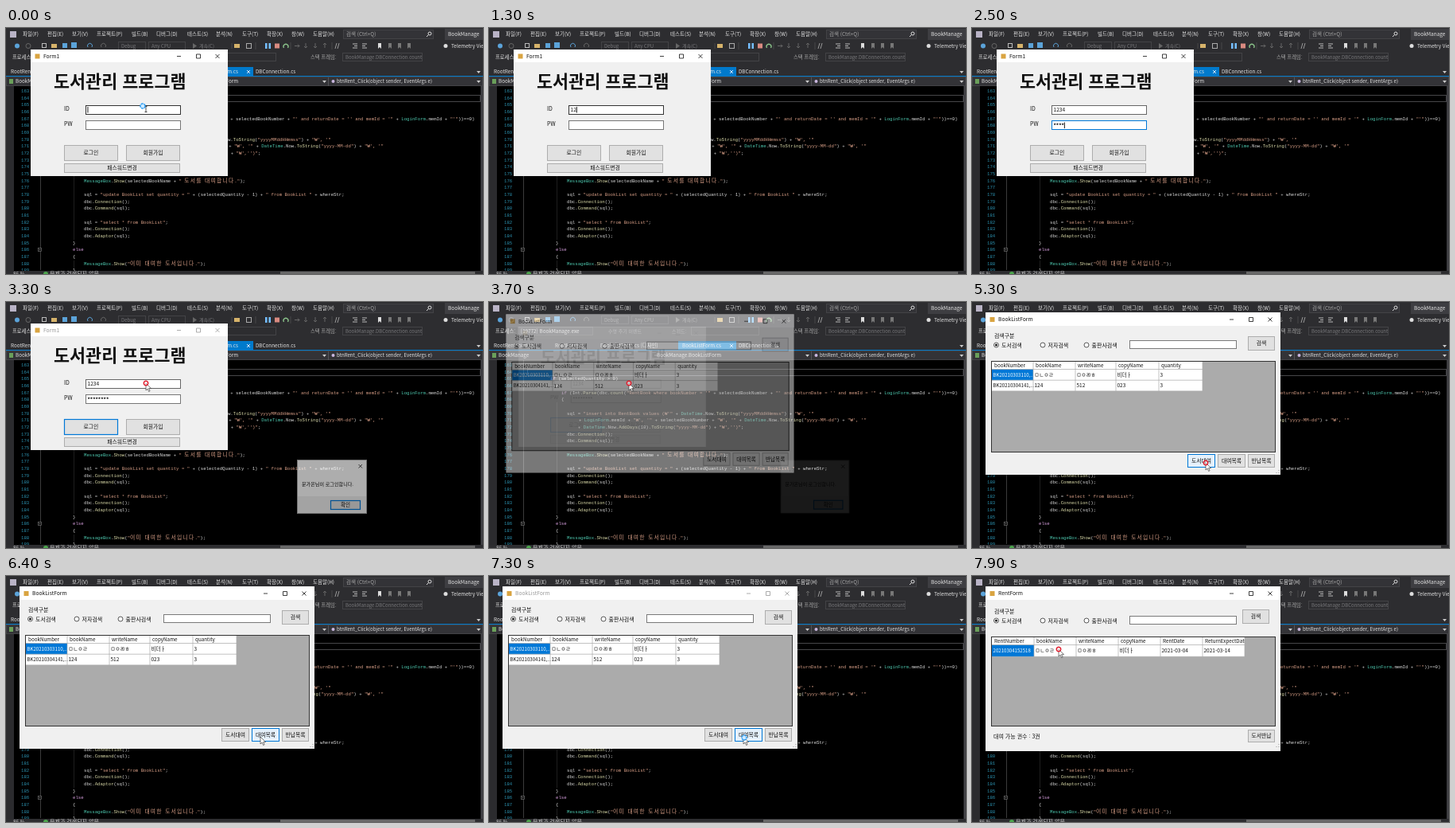
Animation of 600x309 px, one loop 8 s. Source, as an HTML page:

```html
<!DOCTYPE html>
<html lang="ko">
<head>
<meta charset="utf-8">
<title>Book manager</title>
<style>
html, body { margin: 0; width: 100%; height: 100%; overflow: hidden; background: #000; }
svg { display: block; width: 100vw; height: 100vh; }
text { font-family: "Noto Sans CJK KR", "Noto Sans CJK", "Noto Sans", sans-serif; white-space: pre; }
.code { font-family: "Liberation Mono", "Noto Sans CJK KR", monospace; font-size: 5.7px; fill: #dcdcdc; }
.str { fill: #d69d85; }
.key { fill: #d8a0df; }
.type { fill: #4ec9b0; }
.call { fill: #dcdcaa; }
.han { font-size: 6.8px; letter-spacing: 1.2px; }
.win { transform-box: fill-box; transform-origin: center; }
</style>
</head>
<body>
<svg id="stage" viewBox="0 0 600 309" preserveAspectRatio="none"></svg>
<script>
const LOOP = 8000, BLUE = '#0078d7';
const stage = document.getElementById('stage');

// y is the middle of the text line
const text = (x, y, s, { size = 6.3, fill = '#111', attrs = '' } = {}) =>
  `<text x="${x}" y="${y + size * .36}" font-size="${size}" fill="${fill}" ${attrs}>${s}</text>`;
const box = (x1, y1, x2, y2, fill, attrs = '') =>
  `<rect x="${x1}" y="${y1}" width="${x2 - x1}" height="${y2 - y1}" fill="${fill}" ${attrs}/>`;
const framed = (x1, y1, x2, y2, fill, stroke, attrs = '') =>
  box(x1 + .5, y1 + .5, x2 - .5, y2 - .5, fill, `stroke="${stroke}" ${attrs}`);
const line = (d, stroke, w = 1) => `<path d="${d}" fill="none" stroke="${stroke}" stroke-width="${w}"/>`;
const group = (id, body, cls = '') => `<g id="${id}" class="${cls}">${body}</g>`;

function button(x1, y1, x2, y2, label, id = '') {
  return framed(x1, y1, x2, y2, '#e1e1e1', '#adadad', id && `id="${id}"`) +
    text((x1 + x2) / 2, (y1 + y2) / 2, label, { size: 6.8, attrs: 'text-anchor="middle"' });
}

function windowFrame(x1, y1, x2, y2, title, id, bar = 16) {
  const y = y1 + bar / 2 + .5;
  return box(x1, y1, x2, y2, '#f0f0f0') + box(x1, y1, x2, y1 + bar, '#fff') +
    box(x1 + 5.5, y - 3, x1 + 11.5, y + 3, '#d9a441') +
    group(id, text(x1 + 16, y, title, { size: 6.7, fill: 'currentColor' }) +
      line(`M${x2 - 64} ${y}h5M${x2 - 39.5} ${y - 2.5}h5v5h-5zM${x2 - 15.5} ${y - 2.5}l5 5m0 -5l-5 5`, 'currentColor', .8));
}

function paintCode(s) {
  return s.replace(/("[^"]*")|\b(if|else)\b|\b(MessageBox|DateTime|LoginForm)\b|(\w+)(?=\()/g,
    (all, str, key, type) => {
      const cls = str ? 'str' : key ? 'key' : type ? 'type' : 'call';
      const body = all.replace(/[가-힣]+/g, h => `<tspan class="han">${h}</tspan>`);
      return `<tspan class="${cls}">${body}</tspan>`;
    });
}

const codeLines = [
  [165, 77, 'if (selectedQuantity > 0)'],
  [166, 84, '{'],
  [167, 91, `if (Int.Parse(dbc.count("RentBook where bookNumber = '" + selectedBookNumber + "' and returnDate = '' and memId = '" + LoginForm.memId + "'"))==0)`],
  [168, 91, '{'],
  [170, 98, `sql = "insert into RentBook values (₩'" + DateTime.Now.ToString("yyyyMMddHHmmss") + "₩', '"`],
  [171, 113, `+ LoginForm.memId + "₩', '" + selectedBookNumber + "₩', '" + DateTime.Now.ToString("yyyy-MM-dd") + "₩', '"`],
  [172, 112, `+ DateTime.Now.AddDays(10).ToString("yyyy-MM-dd") + "₩','')";`],
  [173, 98, 'dbc.Connection();'],
  [174, 98, 'dbc.Command(sql);'],
  [176, 98, 'MessageBox.Show(selectedBookName + " 도서를 대여합니다.");'],
  [178, 98, 'sql = "update BookList set quantity = " + (selectedQuantity - 1) + " from BookList " + whereStr;'],
  [179, 98, 'dbc.Connection();'],
  [180, 98, 'dbc.Command(sql);'],
  [182, 98, 'sql = "select * from BookList";'],
  [183, 98, 'dbc.Connection();'],
  [184, 98, 'dbc.Adaptor(sql);'],
  [185, 84, '}'],
  [186, 84, 'else'],
  [187, 84, '{'],
  [188, 98, 'MessageBox.Show("이미 대여한 도서입니다.");'],
  [189, 84, '}']
];
const lineY = n => 79 + (n - 163) * 8.66;

function editor() {
  let out = box(0, 73, 600, 309, '#000') + box(0, 73, 10, 309, '#2b2b2e');
  out += line('M43.5 73V304', '#555', .7) + line('M85.5 126V266M85.5 292V304', '#333', .6);
  out += framed(48, 84, 597, 93, 'none', '#464649') + box(597, 73, 600, 305, '#3e3e42');
  for (let n = 163; n < 190; n++)
    out += `<text class="code" x="19" y="${lineY(n) + 2}" style="fill:#2b91af">${n}</text>`;
  for (const [n, x, s] of codeLines)
    out += `<text class="code" x="${x}" y="${lineY(n) + 2}">${paintCode(s)}</text>`;
  out += framed(40, 276, 45, 281, '#000', '#888', 'stroke-width=".6"') + line('M41.5 278.5h2', '#aaa', .6);
  out += box(0, 305, 600, 309, '#2d2d30') + box(345, 306, 590, 309, '#686868');
  out += text(9, 308.5, '86 %', { fill: '#ccc' }) + text(55, 308.5, '문제가 검색되지 않음', { size: 7, fill: '#ccc' });
  return out + `<circle cx="50" cy="309" r="3" fill="#4ca64c"/>`;
}

function toolbar() {
  const light = { fill: '#e6e6e6' }, dim = { fill: '#77777a', size: 6 };
  let out = box(0, 0, 600, 73, '#2d2d30') + box(5, 4, 13, 12, '#b9b3c6');
  const menu = [[21, '파일(F)'], [52, '편집(E)'], [83, '보기(V)'], [114, '프로젝트(P)'], [158, '빌드(B)'],
    [189, '디버그(D)'], [228, '테스트(S)'], [264, '분석(N)'], [297, '도구(T)'], [328, '확장(X)'], [359, '창(W)'], [386, '도움말(H)']];
  for (const [x, s] of menu) out += text(x, 8, s, { ...light, size: 6.5 });
  out += framed(424, 2, 538, 14, '#333337', '#434346') + text(428, 8, '검색 (Ctrl+Q)', { fill: '#aaa', size: 6.5 });
  out += `<circle cx="533" cy="7" r="2" fill="none" stroke="#ddd"/>` + line('M531.5 8.5l-2.5 2.5', '#ddd');
  out += box(552, 1, 600, 15, '#3e3e42') + text(556, 8, 'BookManage', { ...light, size: 6.5 });

  out += `<circle cx="14" cy="22.5" r="3" fill="#5ba3d9"/><circle cx="28" cy="22.5" r="3" fill="none" stroke="#666"/>`;
  out += framed(45, 19, 51, 25, 'none', '#bbb') + box(57, 20, 64, 25, '#d6b36a');
  out += box(71, 19, 77, 25, '#5ba3d9') + box(82, 18, 89, 25, '#5ba3d9');
  out += line('M103 24a3 3 0 1 1 5 0', '#5ba3d9') + line('M120 24a3 3 0 1 1 5 0', '#666');
  out += framed(141, 17, 176, 28, '#2d2d30', '#434346') + text(145, 22.5, 'Debug', dim);
  out += framed(179, 17, 226, 28, '#2d2d30', '#434346') + text(183, 22.5, 'Any CPU', dim);
  out += '<path d="M235 19l5 3.5-5 3.5z" fill="#666"/>' + text(243, 22.5, '계속(C)', dim);
  out += line('M284 19v7M314 18v9M358 18v9M410 18v9', '#555', .7);
  out += box(287, 20, 294, 25, '#d6b36a') + framed(302, 19, 309, 26, 'none', '#aaa');
  out += box(326, 19, 328.5, 26, '#75bfff') + box(330.5, 19, 333, 26, '#75bfff') + box(338, 19.5, 344, 25.5, '#d98a80');
  out += line('M349.5 25a3 3 0 1 1 5 0', '#8bc48b', 1.3);
  out += line('M363 22.5h6l-2 -2m2 2l-2 2M377 19v6m-2 -2l2 2l2 -2M389 19v6m-2 -2l2 2l2 -2M401 25v-6m-2 2l2 -2l2 2', '#666');
  out += line('M414 26l2 -7m1 7l2 -7', '#999') + line('M436 20h6m-4 2.5h4m-6 2.5h6M448 20h6m-6 2.5h4m-4 2.5h6', '#bbb');
  const mark = (x, fill) => `<path d="M${x} 19h4v7l-2-2-2 2z" fill="${fill}"/>`;
  out += mark(468, '#ddd') + mark(481, '#777') + mark(493, '#777') + mark(505, '#777');
  out += '<circle cx="553" cy="22.5" r="2.5" fill="#ddd"/>' + text(560, 22.5, 'Telemetry View', { ...light, size: 6.4 });

  out += text(8, 36.5, '프로세스:', light) + framed(36, 31, 131, 42, '#333337', '#434346') + text(40, 36.5, '[19772] BookManage.exe', light);
  out += text(150, 36.5, '수명 주기 이벤트', dim) + text(230, 36.5, '스레드:', dim) + framed(254, 31, 340, 42, '#2d2d30', '#434346');
  out += text(383, 36.5, '스택 프레임:', { fill: '#aaa' }) + framed(423, 31, 524, 42, '#2d2d30', '#434346') +
    text(427, 36.5, 'BookManage.DBConnection.count', dim);

  out += box(238, 49, 311, 61, '#007acc') + box(0, 60, 600, 61, '#007acc');
  out += text(6, 55, 'RootRentForm.cs', light) + text(83, 55, 'RentForm.cs', light) + text(140, 55, 'BookListForm.cs [디자인]', light);
  out += text(243, 55, 'BookListForm.cs', light) + line('M303 53l4 4m0 -4l-4 4', '#fff', .8) + text(314, 55, 'DBConnection.cs', light);

  out += framed(0, 61, 600, 73, '#333337', '#434346') + box(4, 64, 9, 70, '#6a9f5a');
  out += text(12, 67, 'BookManage', light) + text(211, 67, 'BookManage.BookListForm', light);
  out += line('M203.5 62v11M405.5 62v11', '#55555a') + '<circle cx="411.5" cy="67" r="2" fill="#c9b6de"/>';
  return out + text(416, 67, 'btnRent_Click(object sender, EventArgs e)', { ...light, size: 6.1 }) +
    '<path d="M398 66h5l-2.5 3zM592 54h5l-2.5 3zM592 66h5l-2.5 3z" fill="#ccc"/>';
}

function loginForm() {
  return windowFrame(31, 27, 279, 186, 'Form1', 'loginTitle') +
    text(60, 67.3, '도서관리 프로그램', { size: 21.8, attrs: 'font-weight="700"' }) +
    text(73, 101, 'ID', { size: 7 }) + text(73, 120.5, 'PW', { size: 7 }) +
    framed(100, 97, 220, 109, '#fff', '#333', 'id="idField"') + framed(100, 116, 220, 128, '#fff', '#777', 'id="pwField"') +
    text(102.5, 102.5, '', { size: 6.6, attrs: 'id="idText"' }) +
    text(102.5, 123, '', { size: 6.6, attrs: 'id="pwText" font-weight="700"' }) +
    `<rect id="caret" width=".9" height="7.5" fill="#000"/>` +
    button(73, 147, 141, 167, '로그인', 'loginBtn') + button(151, 147, 219, 167, '회원가입') + button(73, 170, 219, 182, '패스워드변경');
}

function dialog() {
  return framed(366, 198, 454, 266, '#fff', '#aaa') + box(367, 244, 453, 265, '#f0f0f0') +
    line('M443.5 204l4.5 4.5m0 -4.5l-4.5 4.5', '#222', .8) + text(372, 229, '문가온님이 로그인합니다.', { size: 6.1 }) +
    framed(408, 249, 446, 261, '#e1e1e1', BLUE, 'stroke-width="1.2"') +
    text(427, 255, '확인', { size: 6.6, attrs: 'text-anchor="middle"' });
}

// search row shared by both list windows
function searchRow(y) {
  let out = text(28, y - 11, '검색구분', { size: 6.9 });
  [[30.5, '도서검색'], [89, '저자검색'], [144, '출판사검색']].forEach(([x, s], i) => {
    out += `<circle cx="${x}" cy="${y}" r="3" fill="#fff" stroke="#333" stroke-width=".8"/>`;
    if (!i) out += `<circle cx="${x}" cy="${y}" r="1.6" fill="#222"/>`;
    out += text(x + 6.5, y, s, { size: 7 });
  });
  return out + framed(198, y - 6, 333, y + 5, '#fff', '#7a7a7a');
}

function table(top, head, step, cols, names, rows) {
  const right = cols[cols.length - 1], bottom = top + head + step * rows.length;
  let out = framed(24, top, 382, 189, '#ababab', '#333') + box(25, top + 1, right, bottom, '#fff');
  names.forEach((s, i) => out += text(cols[i] + 3, top + head / 2 + .7, s, { size: 6.3 }));
  rows.forEach((row, r) => {
    const y = top + head + step * r;
    if (!r) out += box(25, y, cols[1], y + step, BLUE);
    row.forEach((s, i) => out += text(cols[i] + 1.5, y + step / 2, s, { size: i ? 6.5 : 6.1, fill: r || i ? '#111' : '#fff' }));
    out += line(`M25 ${y}H${right}`, '#aaa', .7);
  });
  return out + line(`M25 ${bottom}H${right}` + cols.slice(1).map(x => `M${x} ${top + 1}V${bottom}`).join(''), '#aaa', .7);
}

const grip = line('M386 211v1M386 214v1M383 214v1', '#999', 1);
const bookForm = () => windowFrame(17, 13, 388, 217, 'BookListForm', 'bookTitle', 17) + searchRow(54) +
  button(347, 43, 381, 61, '검색') +
  table(74, 10.5, 13.7, [25, 77, 130, 181, 235, 290], ['bookNumber', 'bookName', 'writeName', 'copyName', 'quantity'], [
    ['BK20210303110,...', 'ㅁㄴㅇㄹ', 'ㅁㅇㄻㅎ', '비더ㅏ', '3'],
    ['BK20210304141,...', '124', '512', '023', '3']]) +
  button(271, 191, 306, 208, '도서대여', 'rentBtn') + button(309, 191, 344, 208, '대여목록', 'listBtn') +
  button(347, 191, 381, 208, '반납목록') + grip;

const rentForm = () => windowFrame(17, 13, 388, 220, 'RentForm', 'rentTitle', 17) + searchRow(56) +
  button(340, 42, 374, 60, '검색') +
  '<clipPath id="cut"><rect x="24" y="70" width="319" height="40"/></clipPath>' +
  table(76, 10.5, 14.8, [25, 78, 131, 184, 237, 290, 343],
    ['RentNumber', 'bookName', 'writeName', 'copyName', 'RentDate'],
    [['20210304152518', 'ㅁㄴㅇㄹ', 'ㅁㅇㄻㅎ', '비더ㅏ', '2021-03-04', '2021-03-14']]) +
  `<g clip-path="url(#cut)">${text(293, 82, 'ReturnExpectDate')}</g>` +
  text(27, 201, '대여 가능 권수 : 3권', { size: 7 }) + button(347, 193, 381, 209, '도서반납') + grip;

const pointer = '<path id="arrow" d="M0 0v9l2.1-1.9 1.5 3.4 1.5-.7-1.5-3.2h2.9z" fill="#fff" stroke="#222" stroke-width=".6"/>' +
  '<path id="beam" d="M-1.5 -3.5h3M0 -3.5v7M-1.5 3.5h3" fill="none" stroke="#222" stroke-width=".8"/>' +
  '<circle id="busy" r="3" fill="#cfeaff" stroke="#2a9df4" stroke-width="1.5" stroke-dasharray="3 .8"/>' +
  '<circle id="click" r="2.7" fill="#fff" fill-opacity=".5" stroke="#e02030" stroke-width="1.5"/>';

stage.innerHTML = editor() + toolbar() + group('login', loginForm(), 'win') + group('msg', dialog(), 'win') +
  group('books', bookForm(), 'win') + group('rents', rentForm(), 'win') + group('pointer', pointer);

const el = {};
stage.querySelectorAll('[id]').forEach(e => el[e.id] = e);
const set = (id, attrs) => { for (const k in attrs) el[id].setAttribute(k, attrs[k]); };
const show = (id, on) => { el[id].style.display = on ? '' : 'none'; };

// keys: [time, value, ...], linear in between
function mix(t, keys, i = 1) {
  if (t <= keys[0][0]) return keys[0][i];
  for (let k = 1; k < keys.length; k++) {
    const a = keys[k - 1], b = keys[k];
    if (t <= b[0]) return a[i] + (b[i] - a[i]) * (t - a[0]) / (b[0] - a[0]);
  }
  return keys[keys.length - 1][i];
}

function fade(id, t, keys) {
  const o = mix(t, keys);
  show(id, o > 0);
  el[id].style.opacity = o;
  el[id].style.transform = `scale(${mix(t, keys, 2)})`;
}

const opening = start => [[start, 0, .94], [start + 100, .5, .976], [start + 200, .9, .995], [start + 300, 1, 1]];
const path = [[4500, 176, 102], [4700, 196, 121], [5000, 270, 182], [5200, 294, 202], [5900, 294, 202], [6400, 320, 202],
  [7600, 320, 202], [7700, 262, 170], [7800, 160, 118], [7900, 109, 92]];
const within = (t, a, b) => t >= a && t < b;

function draw(t) {
  fade('login', t, [[3600, 1, 1], [3700, .16, .95], [3800, 0, .92]]);
  fade('msg', t, [[3200, 0, .97], [3300, .68, 1], [3400, 1, 1], [3600, 1, 1], [3700, .1, .985], [3800, 0, .95]]);
  fade('books', t, opening(3600));
  fade('rents', t, opening(7300));

  const digits = Math.max(0, Math.min(4, (t - 1100) / 100));
  const stars = t < 2500 ? Math.max(0, Math.floor((t - 1700) / 200)) : Math.min(8, 4 + (t - 2500) / 100);
  const onPw = within(t, 1700, 2900), done = t >= 2900;
  el.idText.textContent = '1234'.slice(0, digits);
  el.pwText.textContent = '*'.repeat(stars);
  set('idField', { stroke: onPw || done ? '#666' : '#333' });
  set('pwField', { stroke: onPw ? BLUE : '#777' });
  set('loginBtn', { stroke: done ? BLUE : '#adadad', 'stroke-width': done ? 1.2 : 1 });
  const field = onPw ? el.pwText : el.idText;
  set('caret', { x: 102.5 + (field.textContent ? field.getComputedTextLength() : 0), y: onPw ? 118.5 : 99 });
  show('caret', !done && (t % 1000 < 600 || t >= 1100));

  const hover = (id, on) => set(id, { fill: on ? '#e5f1fb' : '#e1e1e1', stroke: on ? BLUE : '#adadad' });
  hover('rentBtn', within(t, 5100, 6200));
  hover('listBtn', t >= 6300);
  const active = (id, on) => set(id, { color: on ? '#111' : '#999' });
  active('loginTitle', t < 3200);
  active('bookTitle', t < 7200);
  active('rentTitle', true);

  const start = t < 1100;
  set('pointer', { transform: `translate(${mix(t, path)} ${mix(t, path, 2)})` });
  show('pointer', start || done);
  show('beam', start);
  show('arrow', done);
  show('busy', start || within(t, 7200, 7600));
  set('busy', { transform: `translate(${start ? '-4 -4' : '1 1'}) rotate(${t * .36})` });
  show('click', within(t, 3200, 3800) || within(t, 5300, 5900) || t >= 7900);
}

const origin = performance.now();
function tick() {
  const t = (performance.now() - origin) % LOOP;
  draw(Math.floor(t / 100) * 100);
  requestAnimationFrame(tick);
}
draw(0);
requestAnimationFrame(tick);
</script>
</body>
</html>
```
